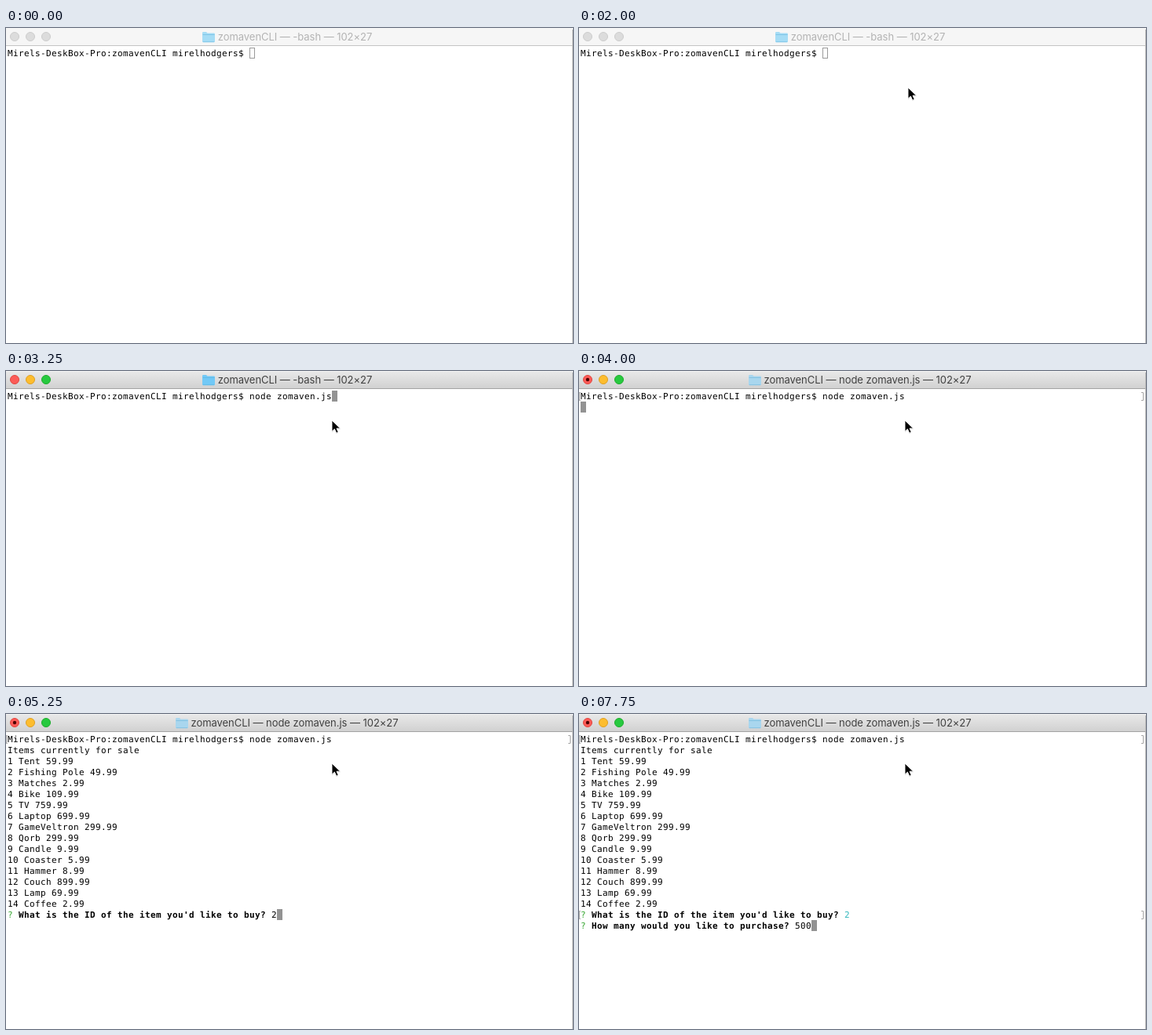
An HTML page that plays this animation: 722 px wide and 402 px high, repeating every 8 s.

```html
<!DOCTYPE html>
<html lang="en">
<head>
<meta charset="utf-8">
<title>Terminal session</title>
<style>
  html, body { margin: 0; width: 100%; height: 100%; overflow: hidden; background: #fff; }
  svg { display: block; width: 722px; height: 402px; }

  .term {
    font: 11px "DejaVu Sans Mono", monospace;
    letter-spacing: calc(7px - 1ch); /* whole-pixel character cells */
    text-rendering: geometricPrecision;
  }
  .title { font: 13px Inter, sans-serif; letter-spacing: -.05px; text-anchor: middle; fill: #404040; }
  .bold { font-weight: bold; }
  .mark { fill: #3aa935; }
  .bracket { fill: none; stroke: #a6a6a6; }

  .step, .bash, .folder, .caret, .answer, .pointer { animation: 8s step-end infinite; }
  .step, .answer, .caret, .pointer { opacity: 0; }

  .focus   { animation-name: focus; }
  .node    { animation-name: node; }
  .file    { animation-name: file; }
  .run     { animation-name: run; }
  .list    { animation-name: list; }
  .amount  { animation-name: amount; }
  .digit   { animation-name: digit; }
  .zeros   { animation-name: zeros; }
  .bash    { animation-name: bash; fill: #b3b3b3; }
  .folder  { animation-name: folder; fill: #a5dcf5; transform: translate(250px, 4px); }
  .caret   { animation-name: caret; fill: #939393; }
  .answer  { animation-name: answer; }
  .pointer { animation-name: pointer; }

  @keyframes focus  { 28.125%, to { opacity: 1; } }
  @keyframes node   { 34.375%, to { opacity: 1; } }
  @keyframes file   { 40.625%, to { opacity: 1; } }
  @keyframes run    { 50%, to { opacity: 1; } }
  @keyframes list   { 56.25%, to { opacity: 1; } }
  @keyframes amount { 81.25%, to { opacity: 1; } }
  @keyframes digit  { 93.75%, to { opacity: 1; } }
  @keyframes zeros  { 96.875%, to { opacity: 1; } }

  @keyframes bash {
    28.125% { fill: #404040; }
    50%, to { fill: #404040; opacity: 0; }
  }
  @keyframes folder {
    28.125% { fill: #72c9f6; transform: translate(250px, 4px); }
    50%, to { fill: #a9d6ee; transform: translate(216px, 4px); }
  }
  @keyframes answer {
    65.625% { opacity: 1; fill: #000; }
    81.25%, to { opacity: 1; fill: #35b8bd; }
  }
  @keyframes caret {
    28.125% { opacity: 1; transform: translate(310px, 25px); }
    34.375% { opacity: 1; transform: translate(345px, 25px); }
    40.625% { opacity: 1; transform: translate(415px, 25px); }
    50%     { opacity: 1; transform: translate(2px, 39px); }
    56.25%  { opacity: 1; transform: translate(338px, 249px); }
    65.625% { opacity: 1; transform: translate(345px, 249px); }
    81.25%  { opacity: 1; transform: translate(275px, 263px); }
    93.75%  { opacity: 1; transform: translate(282px, 263px); }
    96.875%, to { opacity: 1; transform: translate(296px, 263px); }
  }
  @keyframes pointer {
    3.125%  { opacity: 1; transform: translate(463px, 59px); }
    6.25%   { opacity: 1; transform: translate(434px, 92px); }
    25%     { opacity: 1; transform: translate(418px, 75px); }
    28.125%, to { opacity: 1; transform: translate(414px, 62px); }
  }
</style>
</head>
<body>
<svg viewBox="0 0 722 402">
  <defs>
    <linearGradient id="bar" x2="0" y2="1">
      <stop stop-color="#e9e9e9"/>
      <stop offset="1" stop-color="#d1d1d1"/>
    </linearGradient>
    <path id="brackets" d="M2 27.5H.5V37.5H2M716 27.5H718.5V37.5H716"/>
  </defs>

  <rect width="722" height="402" fill="#fff"/>

  <!-- title bar, unfocused then focused -->
  <rect width="722" height="22" fill="#f6f6f6"/>
  <rect y="22" width="722" height="1" fill="#c4c4c4"/>
  <g fill="#dcdcdc" stroke="#cdcdcd">
    <circle cx="11" cy="11" r="5.5"/>
    <circle cx="31" cy="11" r="5.5"/>
    <circle cx="51" cy="11" r="5.5"/>
  </g>
  <g class="step focus">
    <rect width="722" height="22" fill="url(#bar)"/>
    <rect width="722" height="1" fill="#f3f3f3"/>
    <rect y="22" width="722" height="1" fill="#a3a3a3"/>
    <circle cx="11" cy="11" r="5.5" fill="#fc5b57" stroke="#e2463f"/>
    <circle cx="31" cy="11" r="5.5" fill="#fdbd2e" stroke="#dfa023"/>
    <circle cx="51" cy="11" r="5.5" fill="#27c93f" stroke="#1dad2b"/>
  </g>
  <circle class="step run" cx="11" cy="11" r="2.2" fill="#4d0000"/>
  <rect x="721" y="2" width="1" height="400" fill="#b5b5b5"/>

  <g class="folder">
    <path d="M0 2.2Q0 1 1.2 1H5L6.5 2.5H14.8Q16 2.5 16 3.7V13Q16 14.2 14.8 14.2H1.2Q0 14.2 0 13Z"/>
    <path d="M.5 4.5H15.5M.8 13.7H15.2" fill="none" stroke="#4aa3d0" stroke-opacity=".4"/>
  </g>
  <g class="title">
    <text class="bash" x="368" y="16">zomavenCLI — -bash — 102×27</text>
    <text class="step run" x="367.5" y="16">zomavenCLI — node zomaven.js — 102×27</text>
  </g>

  <g class="term">
    <text x="2" y="36">Mirels-DeskBox-Pro:zomavenCLI mirelhodgers$</text>
    <rect x="310.5" y="25.5" width="6" height="13" fill="#fff" stroke="#9a9a9a"/>
    <rect class="step focus" x="310" y="25" width="7" height="14" fill="#fff"/>
    <rect class="caret" width="7" height="14"/>
    <text class="step node" x="310" y="36">node</text>
    <text class="step file" x="345" y="36">zomaven.js</text>
    <use class="step run bracket" href="#brackets"/>

    <g class="step list">
      <text y="36">
        <tspan x="2" dy="14">Items currently for sale</tspan>
        <tspan x="2" dy="14">1 Tent 59.99</tspan>
        <tspan x="2" dy="14">2 Fishing Pole 49.99</tspan>
        <tspan x="2" dy="14">3 Matches 2.99</tspan>
        <tspan x="2" dy="14">4 Bike 109.99</tspan>
        <tspan x="2" dy="14">5 TV 759.99</tspan>
        <tspan x="2" dy="14">6 Laptop 699.99</tspan>
        <tspan x="2" dy="14">7 GameVeltron 299.99</tspan>
        <tspan x="2" dy="14">8 Qorb 299.99</tspan>
        <tspan x="2" dy="14">9 Candle 9.99</tspan>
        <tspan x="2" dy="14">10 Coaster 5.99</tspan>
        <tspan x="2" dy="14">11 Hammer 8.99</tspan>
        <tspan x="2" dy="14">12 Couch 899.99</tspan>
        <tspan x="2" dy="14">13 Lamp 69.99</tspan>
        <tspan x="2" dy="14">14 Coffee 2.99</tspan>
      </text>
      <text class="mark" x="2" y="260">?</text>
      <text class="bold" x="16" y="260">What is the ID of the item you'd like to buy?</text>
    </g>
    <text class="answer" x="338" y="260">2</text>

    <g class="step amount">
      <use class="bracket" href="#brackets" y="224"/>
      <text class="mark" x="2" y="274">?</text>
      <text class="bold" x="16" y="274">How many would you like to purchase?</text>
    </g>
    <text class="step digit" x="275" y="274">5</text>
    <text class="step zeros" x="282" y="274">00</text>
  </g>

  <g class="pointer">
    <path d="M1 2V16.2L4.4 13 6.7 18 9.2 17 7 12.2H11.8Z" fill="#000" opacity=".18"/>
    <path d="M1 1V15.2L4.4 12 6.7 17.2 9.2 16.1 7 11.2H11.6Z" fill="#000" stroke="#fff" stroke-width=".9"/>
  </g>
</svg>
</body>
</html>
```
